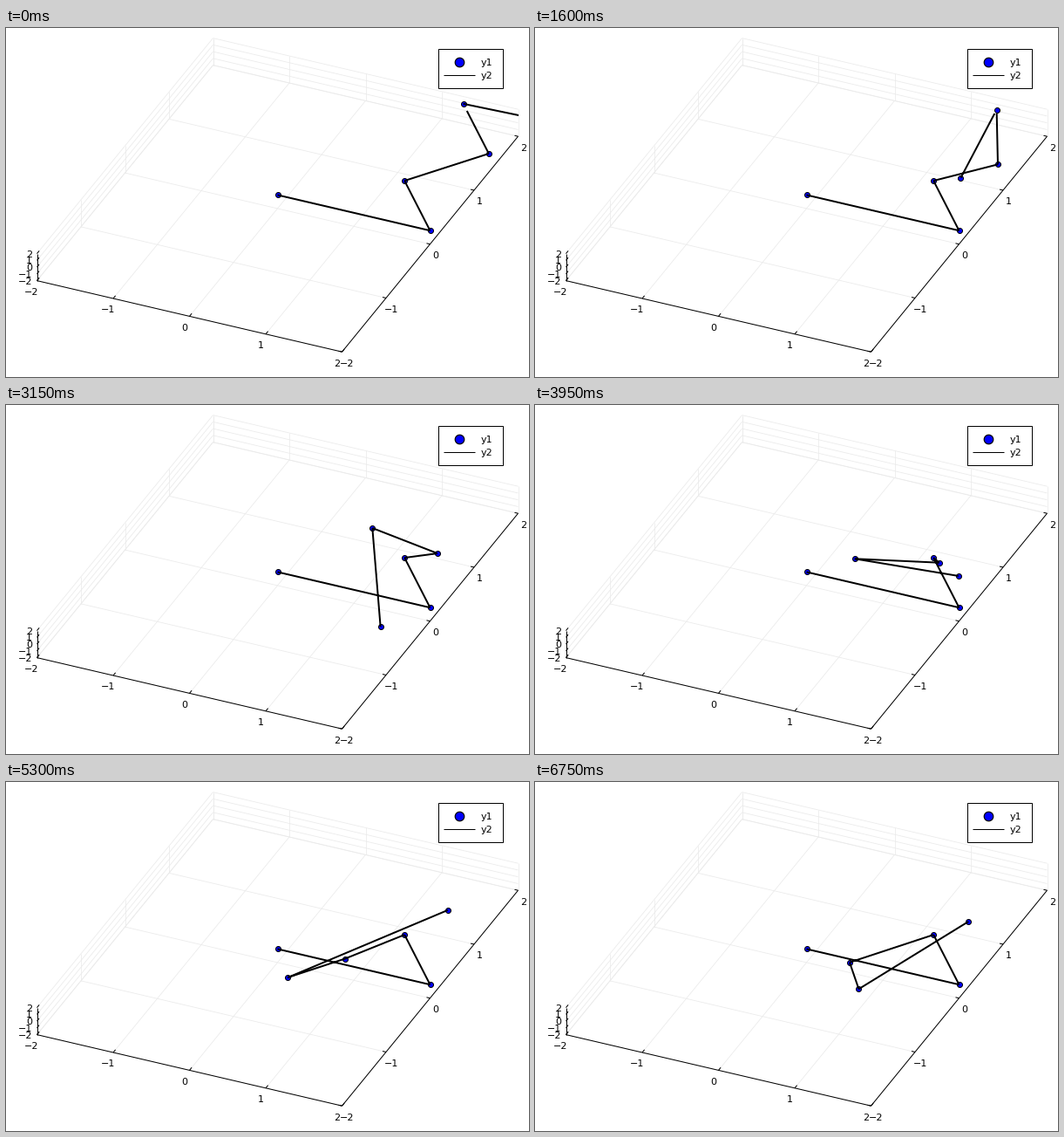
Write a matplotlib script that moves like this. It is 600x400 px and loops after 6.8 s.

```python
import numpy as np
import matplotlib.pyplot as plt
from matplotlib.animation import FuncAnimation

W, H, FRAMES, STEP = 600, 400, 136, 50
LIM = 2
RIGHT = 588  # right edge of the plot area in pixels

fig = plt.figure(figsize=(W / 100, H / 100), dpi=100, facecolor="white")
ax = fig.add_axes([0, 0, 1, 1])
ax.set_xlim(0.5, W + 0.5)
ax.set_ylim(H + 0.4, 0.4)
ax.axis("off")


def px(width):
    return width * 0.72


def project(p):
    x, y, z = np.asarray(p, float) + LIM
    return np.array([36 + 87.5 * x + 50.5 * y,
                     290 + 20.4 * x - 61.75 * y - 7.75 * z])


def stroke(p, q, color="black", width=1.0, order=1):
    ax.plot([p[0], q[0]], [p[1], q[1]], color=color, lw=px(width),
            solid_capstyle="butt", zorder=order)


def label(x, y, text, ha="center", order=3):
    ax.text(x, y, text, fontsize=8, family="DejaVu Sans", ha=ha,
            va="center_baseline", zorder=order)


# Grid on the left wall, the back wall and the floor
for wall, side in enumerate((-LIM, LIM, -LIM)):
    for axis in {0, 1, 2} - {wall}:
        for k in range(-LIM, LIM + 1):
            p = np.full(3, -LIM)
            p[wall], p[axis] = side, k
            q = p.copy()
            q[3 - wall - axis] = LIM
            stroke(project(p), project(q), "#ebebeb", 0.8, 0)

# Axes, ticks and tick labels
corner = project((LIM, -LIM, -LIM))
start = project((-LIM, -LIM, -LIM))
stroke(start, corner)
stroke(corner, project((LIM, LIM, -LIM)))
stroke(start, project((-LIM, -LIM, LIM)))
for k in range(-LIM, LIM + 1):
    text = str(k).replace("-", "\u2212")
    tx = project((k, -LIM, -LIM))
    ty = project((LIM, k, -LIM))
    tz = project((-LIM, -LIM, k))
    stroke(tx, tx + (2.6, -3.2))
    stroke(ty, ty + (-4, -0.9))
    stroke(tz, tz + (2.6, -3.2))
    label(tx[0] - 6, tx[1] + 12.3, text)
    label(ty[0] + 6, ty[1] + 12.5, text)
    label(30.5, tz[1], text, "right")

# Legend
ax.add_patch(plt.Rectangle((496, 24), 74, 45, fc="white", ec="black",
                           lw=px(1), zorder=8))
ax.plot([520], [39], "o", ms=px(10.5), mfc="blue", mec="black", mew=px(1.2),
        zorder=9)
stroke((502, 54), (538, 54), order=9)
label(545, 39, "y1", "left", 9)
label(545, 54, "y2", "left", 9)

# Arm: two fixed links, then three turning joints
BASE = np.radians(46.85)
U = np.array([np.cos(BASE), np.sin(BASE), 0])
V = np.array([-np.sin(BASE), np.cos(BASE), 0])
Z = np.array([0, 0, 1.0])

# Key poses: seconds, then shoulder, elbow and wrist in degrees.
# The joints turn at a steady rate from one pose to the next.
POSES = np.array([
    (0, 0, 0, 0), (0.95, 17.6, 31, -28.5), (1.4, 31.5, 30, -55),
    (2.15, 64.3, 7.4, -90.6), (3.15, 67, -34.6, -124.5),
    (4.05, 88.5, -60, -172), (4.9, 127, -80.5, -186),
    (5.6, 141, -106, -186), (6.3, 174.7, -113, -181),
    (6.75, 174.7, -127, -171.5)])


def arm(t):
    a, b, c = (np.radians(np.interp(t, POSES[:, 0], turn))
               for turn in POSES.T[1:])
    fore = np.cos(a) * U - np.sin(a) * Z
    up = np.sin(a) * U + np.cos(a) * Z
    side = np.cos(b) * V + np.sin(b) * up
    norm = -np.sin(b) * V + np.cos(b) * up
    hand = np.sqrt(2) * (np.cos(c) * fore + np.sin(c) * norm - side)
    return np.cumsum([0 * Z, (2, 0, 0), V, fore, side, hand], axis=0)


def clip(p, q):
    """Cut a link at the box sides; links wholly behind the box stay whole."""
    if p[1] > LIM and q[1] > LIM:
        return p, q
    for i in (1, 0):
        if p[i] > LIM and q[i] > LIM:
            return None
        if max(p[i], q[i]) > LIM:
            cut = p + (LIM - p[i]) / (q[i] - p[i]) * (q - p)
            p, q = (cut, q) if p[i] > LIM else (p, cut)
    return p, q


dots, = ax.plot([], [], "o", ms=px(6), mfc="blue", mec="black", mew=px(1),
                zorder=4)
rods, = ax.plot([], [], color="black", lw=px(2), solid_capstyle="butt",
                solid_joinstyle="round", zorder=5)
rods.set_clip_path(plt.Rectangle((0, 0), RIGHT + 0.5, H,
                                 transform=ax.transData))


def draw(i):
    joints = arm(i * STEP / 1000)
    seen = [s for s in map(project, joints) if s[0] <= RIGHT]
    dots.set_data(*np.transpose(seen))
    path = []
    for p, q in zip(joints, joints[1:]):
        part = clip(p, q)
        if part:
            path += [project(part[0]), project(part[1]), (np.nan, np.nan)]
    rods.set_data(*np.transpose(path))
    return dots, rods


anim = FuncAnimation(fig, draw, frames=FRAMES, interval=STEP, repeat=True,
                     repeat_delay=0, blit=False)
plt.show()
```
